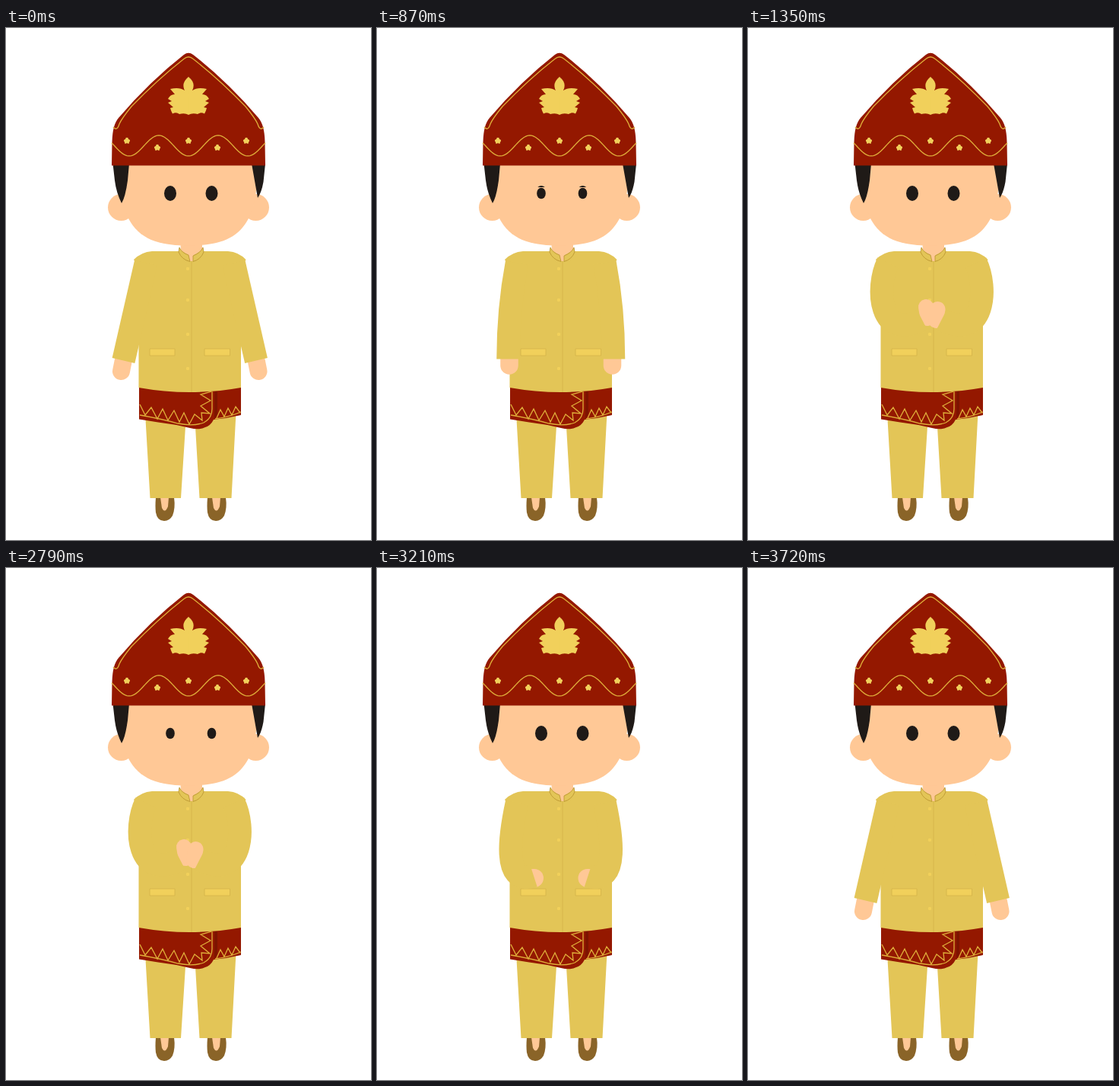
Recreate the animation shown at these times as an HTML page. Size 480 by 672 pixels, loop 3.75 s.

```html
<!DOCTYPE html>
<html lang="en">
<head>
<meta charset="utf-8">
<title>Greeting</title>
<style>
html, body { margin: 0; width: 100%; height: 100%; overflow: hidden; background: #fff; }
svg { display: block; width: 100%; height: 100%; }
.gold { fill: #e3c557; }
.light { fill: #f1d05b; }
.red { fill: #941800; }
.skin { fill: #ffc896; }
.hair { fill: #1f1a17; }
.shoe { fill: #8a6428; }
.trim { fill: none; stroke: #dfae3a; stroke-width: 1.3; }
.seam { stroke: #d3b34a; stroke-width: .8; }
.collar { stroke: #b8922f; stroke-width: .8; }
.sleeve { fill: none; stroke: #e3c557; stroke-width: 30.5; }
.hand { stroke: #ffc896; stroke-linecap: round; }
</style>
</head>
<body>
<svg viewBox="0 0 480 672" xmlns="http://www.w3.org/2000/svg">
  <defs>
    <g id="shoe">
      <path class="shoe" d="M197 616H221Q223 630 219 640Q215 647 208 647Q199 647 197 636Q196 628 197 616Z"/>
      <path class="skin" d="M203 616H214L213 628Q209 638 205 630Z"/>
    </g>
    <path id="leaf" class="light" d="M239.8 64Q250 72 245 82Q252 77 264 80L258 87Q264 87 267 93L262 96L267 98L260 104L264 105Q263 109 261 112.500Q256 110 252 113Q245 111 239.8 114Z"/>
    <path id="edge" class="trim" d="M141 130Q146 136 149 126Q152 119 165 103Q200 67 234 40.500Q237 38 240 38"/>
    <path id="bud" class="light" d="M0 -4.2Q2 -4.2 2 -2Q4.5 -1.5 4 .6Q2.6 1.5 2.8 3.6Q1 4.4 0 2.8Q-1 4.4 -2.8 3.6Q-2.6 1.5 -4 .6Q-4.5 -1.5 -2 -2Q-2 -4.2 0 -4.2Z"/>
  </defs>

  <use href="#shoe"/>
  <use href="#shoe" x="68"/>
  <path class="gold" d="M183 505L189.500 617H230L236.500 515ZM248.500 515L254.500 617H296.500L302.500 505Z"/>

  <path class="red" d="M175 468H309V508Q292 512 273 514Q269 522 262 524Q254 528 242 525Q222 520 200 517.500L175 513.500Z"/>
  <path d="M274 477H278V506L274 513Z" fill="#7d1400"/>
  <path class="trim" d="M176 508Q205 513 226 519Q246 523 260 518Q271 512 271 500V477"/>
  <path class="trim" d="M176 494L183 508L191 498L199 513L206 500L213 515L221 502L228 517L234 505L241 520L248 507L258 515L257 505L268 506L256 496L269 489L256 481L270 477"/>
  <path class="trim" d="M275 513Q292 511 309 504M277 512L282 501L287 510L292 499L297 508L302 497L308 505"/>

  <path class="gold" d="M168 304Q178 294 192 293H292Q306 294 315.500 304L309 316V472Q242 484 174.500 472V316Z"/>
  <path class="seam" d="M244 306V478"/>
  <path class="light seam" d="M189 421H222V430H189ZM261 421H294.500V430H261Z"/>
  <g id="buttons"></g>

  <path class="skin" d="M229 278H258V292L247 298V306H240V298L230 292Z"/>
  <path class="gold collar" d="M228 288L227 294Q231 304 242 306.500L240 298Q231 295 228 288ZM259 288L260 294Q256 304 246 306.500V299Q256 295 259 288Z"/>

  <circle class="skin" cx="151.500" cy="235.500" r="17.500"/>
  <circle class="skin" cx="328.500" cy="235.500" r="17.500"/>
  <path class="skin" d="M150 175V200C153 275 193 285.500 240 285.500S327 275 330 200V175Z"/>
  <path class="hair" d="M140.500 178H162L160 200Q157 222 152 230Q145 216 143 200ZM323 178H341L338.500 202Q336 216 331 223Z"/>

  <path class="red" d="M139 180.500L139.500 150Q140 127 148 118Q189 70 234 35Q240 30.500 246 35Q291 70 332 118Q340 127 340.500 150L341 180.500Z"/>
  <use href="#edge"/>
  <use href="#edge" transform="matrix(-1 0 0 1 480 0)"/>
  <path id="wave" class="trim"/>
  <use href="#leaf"/>
  <use href="#leaf" transform="matrix(-1 0 0 1 480 0)"/>
  <use href="#bud" x="159" y="148"/>
  <use href="#bud" x="199" y="157"/>
  <use href="#bud" x="240" y="148"/>
  <use href="#bud" x="278" y="157"/>
  <use href="#bud" x="316" y="148"/>

  <path id="lids" class="hair" d="M211.200 209Q216 205 220.800 209ZM265.700 209Q270.500 205 275.300 209Z"/>
  <ellipse class="eye hair" cx="216" cy="217"/>
  <ellipse class="eye hair" cx="270.500" cy="217"/>

  <g class="arm"><path class="hand"/><path class="sleeve"/></g>
  <g class="arm" transform="matrix(-1 0 0 1 483.500 0)"><path class="hand"/><path class="sleeve"/></g>
</svg>
<script>
const LOOP = 3750, STEP = 30;
const $ = s => document.querySelector(s);
const $$ = s => [...document.querySelectorAll(s)];
const set = (el, attrs) => { for (const k in attrs) el.setAttribute(k, attrs[k]); };

// sleeve controls (x1 y1 x2 y2), wrist (x y), hand from (x y) to (x y), hand width
const poses = [
  [174, 351, 164, 394, 154.5, 436.5, 154, 438, 151.5, 450.5, 23],
  [177, 345, 172.5, 390, 172.5, 434.5, 174, 434, 174, 443, 23.5],
  [176, 345, 163, 418, 206, 404, 205, 407, 207, 407, 24],
  [168, 340, 172, 412, 229, 383, 234, 366, 236.5, 381, 20]
];

const clamp = x => Math.min(1, Math.max(0, x));
const easeIn = x => x * x;
const easeOut = x => x * (2 - x);

// runs 0 to 3 through the poses: soft start, steady middle, soft stop
function travel(t, a, b, c, d) {
  const part = (from, to) => clamp((t - from) / (to - from));
  return easeIn(part(a, b)) + part(b, c) + easeOut(part(c, d));
}

function poseAt(t) {
  return t < 2000 ? travel(t, 470, 870, 1080, 1350)
                  : 3 - travel(t, 2780, 3210, 3440, 3720);
}

function eyeScale(t) {
  const gap = Math.min(Math.abs(t - 915), Math.abs(t - 2835));
  return clamp(0.325 + gap * 0.009);
}

function drawArms(p) {
  const i = Math.min(2, Math.floor(p)), f = p - i;
  const [x1, y1, x2, y2, wx, wy, ax, ay, bx, by, width] =
    poses[i].map((v, k) => v + (poses[i + 1][k] - v) * f);
  $$('.arm').forEach((arm, side) => {
    const drop = side * 3 * Math.max(0, p - 2);
    set(arm.firstChild, { d: `M${ax} ${ay + drop}L${bx} ${by + drop}`, 'stroke-width': width });
    set(arm.lastChild, { d: `M184 308C${x1} ${y1} ${x2} ${y2} ${wx} ${wy}` });
  });
}

function draw(now) {
  const t = Math.floor(now % LOOP / STEP) * STEP;
  const s = eyeScale(t);
  $$('.eye').forEach(eye => set(eye, { rx: 8 * s, ry: 10 * s }));
  set($('#lids'), { visibility: t >= 870 && t < 990 ? 'visible' : 'hidden' });
  drawArms(poseAt(t));
}

let wave = '';
for (let x = 139; x <= 341; x += 2) {
  wave += `${wave ? 'L' : 'M'}${x} ${154.5 + 13.5 * Math.cos((x - 240) * Math.PI / 39)}`;
}
set($('#wave'), { d: wave });
$('#buttons').innerHTML = [316, 357, 402, 447]
  .map(y => `<circle class="light" cx="239" cy="${y}" r="2.2"/>`).join('');

const start = performance.now();
function tick() {
  draw(performance.now() - start);
  requestAnimationFrame(tick);
}
tick();
</script>
</body>
</html>
```
